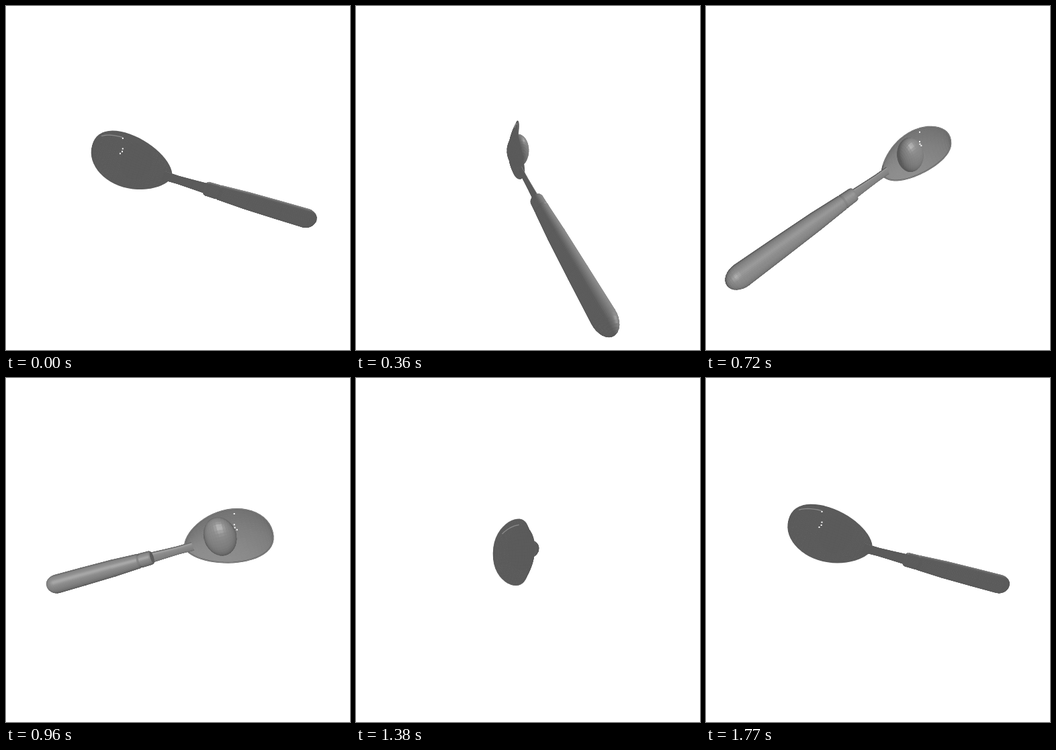
Recreate the animation shown at these times as an HTML page with a canvas. Size 512 by 512 pixels, loop 1.8 s.

```html
<!DOCTYPE html>
<html lang="en">
<head>
<meta charset="utf-8">
<title>Turning spoon</title>
<style>
  html, body { margin: 0; width: 100%; height: 100%; overflow: hidden; background: #fff; }
  canvas { display: block; width: 512px; height: 512px; }
</style>
</head>
<body>
<canvas id="stage" width="512" height="512"></canvas>
<script>
const ctx = document.getElementById('stage').getContext('2d');
ctx.lineJoin = ctx.lineCap = 'round';

const STEP = 30, STEPS = 60;
const FOCAL = 443.4, DISTANCE = 2.12, PITCH = 0.36;
const TILT = [0.942, 0.334];
const SHADE = 91;
const { sin, cos, PI, sqrt, hypot, max } = Math;
const range = n => Array.from({ length: n + 1 }, (_, i) => i);

// Points are [along, down, side]; the spoon's axis slopes down to the knob.
const axisY = u => 0.008 + 0.347 * u;
const onAxis = (u, across, side) =>
  [u - TILT[1] * across, axisY(u) + TILT[0] * across, side];

const unit = v => { const l = hypot(...v) || 1; return v.map(x => x / l); };
const dot = (a, b) => a[0] * b[0] + a[1] * b[1] + a[2] * b[2];
const sub = (a, b) => a.map((x, i) => x - b[i]);
const cross = (a, b) => [
  a[1] * b[2] - a[2] * b[1], a[2] * b[0] - a[0] * b[2], a[0] * b[1] - a[1] * b[0]];
const LIGHT = unit([0.15, -0.55, -0.85]);

function loft(rings, sides, dy, side) {
  return rings.map(([u, high, wide]) => range(sides).map(j => {
    const a = 2 * PI * j / sides;
    return onAxis(u, dy + high * cos(a), side(u) - wide * sin(a));
  }));
}

const dome = range(8).map(k => {
  const a = PI / 2 * k / 8;
  return [0.98 + 0.08 * sin(a), 0.074 * cos(a), 0.06 * cos(a)];
});
const handle = loft([
  [-0.1, 0.03, 0.008], [0, 0.028, 0.01], [0.1, 0.032, 0.01], [0.2, 0.037, 0.011],
  [0.2, 0.046, 0.039], [0.21, 0.05, 0.043], [0.285, 0.052, 0.045], [0.292, 0.047, 0.041],
  [0.3, 0.053, 0.046], [0.5, 0.064, 0.053], [0.75, 0.07, 0.057], ...dome
], 48, 0, u => 0.018 * cos(PI / 2 * u));

const lump = loft(range(18).map(k => {
  const a = PI * k / 18;
  return [-0.3 - 0.1 * cos(a), 0.135 * sin(a), 0.08 * sin(a)];
}), 36, -0.028, () => -0.025);

function bowlPoint(s, v) {
  const half = 0.389 * s ** 0.62 * (1 - s) ** 0.45;
  const u = -0.05 - 0.56 * s;
  const dip = 0.05 * (1 - v * v) * sqrt(max(0, sin(PI * s)));
  return onAxis(u, half * v - 0.005, 0.012 - 0.152 * s ** 2.5 + dip);
}
const stations = range(28).map(i => (1 - cos(PI * i / 28)) / 2);
const bowl = stations.map(s => range(20).map(j => bowlPoint(s, j / 10 - 1)));
const rim = [...stations.map(s => bowlPoint(s, -1)),
             ...[...stations].reverse().map(s => bowlPoint(s, 1))];
const lip = range(8).map(i => bowlPoint(0.68 + 0.03 * i, -0.84));
const gaps = [[-0.385, -0.192], [-0.38, -0.212], [-0.4, -0.178], [-0.375, -0.285]];

function camera(angle) {
  const c = cos(angle), s = sin(angle), cp = cos(PITCH), sp = sin(PITCH);
  return {
    view: [cp * s, -sp, cp * c],
    project([u, y, w]) {
      const x = u * c - w * s, z = u * s + w * c;
      const scale = FOCAL / (DISTANCE - z * cp + y * sp);
      return [256 + x * scale, 256 + (y * cp + z * sp) * scale];
    }
  };
}

function trace(points) {
  ctx.beginPath();
  points.forEach(p => ctx.lineTo(p[0], p[1]));
}

function line(points, gray, width) {
  trace(points);
  ctx.strokeStyle = `rgb(${gray},${gray},${gray})`;
  ctx.lineWidth = width;
  ctx.stroke();
}

function paint({ flat, gray }) {
  trace(flat);
  ctx.closePath();
  ctx.fillStyle = ctx.strokeStyle = `rgb(${gray},${gray},${gray})`;
  ctx.lineWidth = 0.9;
  ctx.fill();
  ctx.stroke();
}

function shade(normal, view, gloss) {
  const lit = dot(normal, LIGHT);
  if (lit <= 0) return SHADE;
  const half = unit(LIGHT.map((x, i) => x + view[i]));
  return Math.round(SHADE + 52 * lit + gloss * max(0, dot(normal, half)) ** 40);
}

function faces(grid, cam, gloss) {
  const flat = grid.map(row => row.map(cam.project));
  const out = [];
  for (let i = 0; i + 1 < grid.length; i++) {
    for (let j = 0; j + 1 < grid[i].length; j++) {
      const pick = g => [g[i][j], g[i + 1][j], g[i + 1][j + 1], g[i][j + 1]];
      const q = pick(flat), p = pick(grid);
      const area = (q[2][0] - q[0][0]) * (q[3][1] - q[1][1])
                 - (q[2][1] - q[0][1]) * (q[3][0] - q[1][0]);
      let n = unit(cross(sub(p[2], p[0]), sub(p[3], p[1])));
      if (area < 0) n = n.map(x => -x);
      out.push({ flat: q, front: area > 0, gray: shade(n, cam.view, gloss) });
    }
  }
  return out;
}

function drawHandle(cam, near) {
  const list = faces(handle, cam, 32).filter(f => f.front);
  (near ? list : list.reverse()).forEach(paint);
}

function drawBowl(cam, angle) {
  const skin = faces(bowl, cam, 0);
  const edge = rim.map(cam.project);
  skin.filter(f => f.front).forEach(paint);
  line(edge, 100, 2);
  if (cos(angle) < 0.2) line(edge, 142, 0.8);
  faces(lump, cam, 45).filter(f => f.front).forEach(paint);
  skin.filter(f => !f.front).forEach(f => paint({ flat: f.flat, gray: SHADE }));
  if (cos(angle) > 0) line(lip.map(cam.project), 138, 1.3);
  if (Math.abs(cos(angle)) > 0.6) {
    ctx.fillStyle = '#fff';
    for (const [u, y] of gaps) {
      const [px, py] = cam.project([u, y, -0.03]);
      ctx.fillRect(px - 1, py - 1, 2, 2);
    }
  }
}

function draw(time) {
  const angle = (Math.floor(time / STEP) % STEPS * 6 - 3) * PI / 180;
  const cam = camera(angle), near = sin(angle) > -0.2;
  ctx.fillStyle = '#fff';
  ctx.fillRect(0, 0, 512, 512);
  if (!near) drawHandle(cam, false);
  drawBowl(cam, angle);
  if (near) drawHandle(cam, true);
}

let start;
function tick(now) {
  start ??= now;
  draw(now - start);
  requestAnimationFrame(tick);
}
draw(0);
requestAnimationFrame(tick);
</script>
</body>
</html>
```
